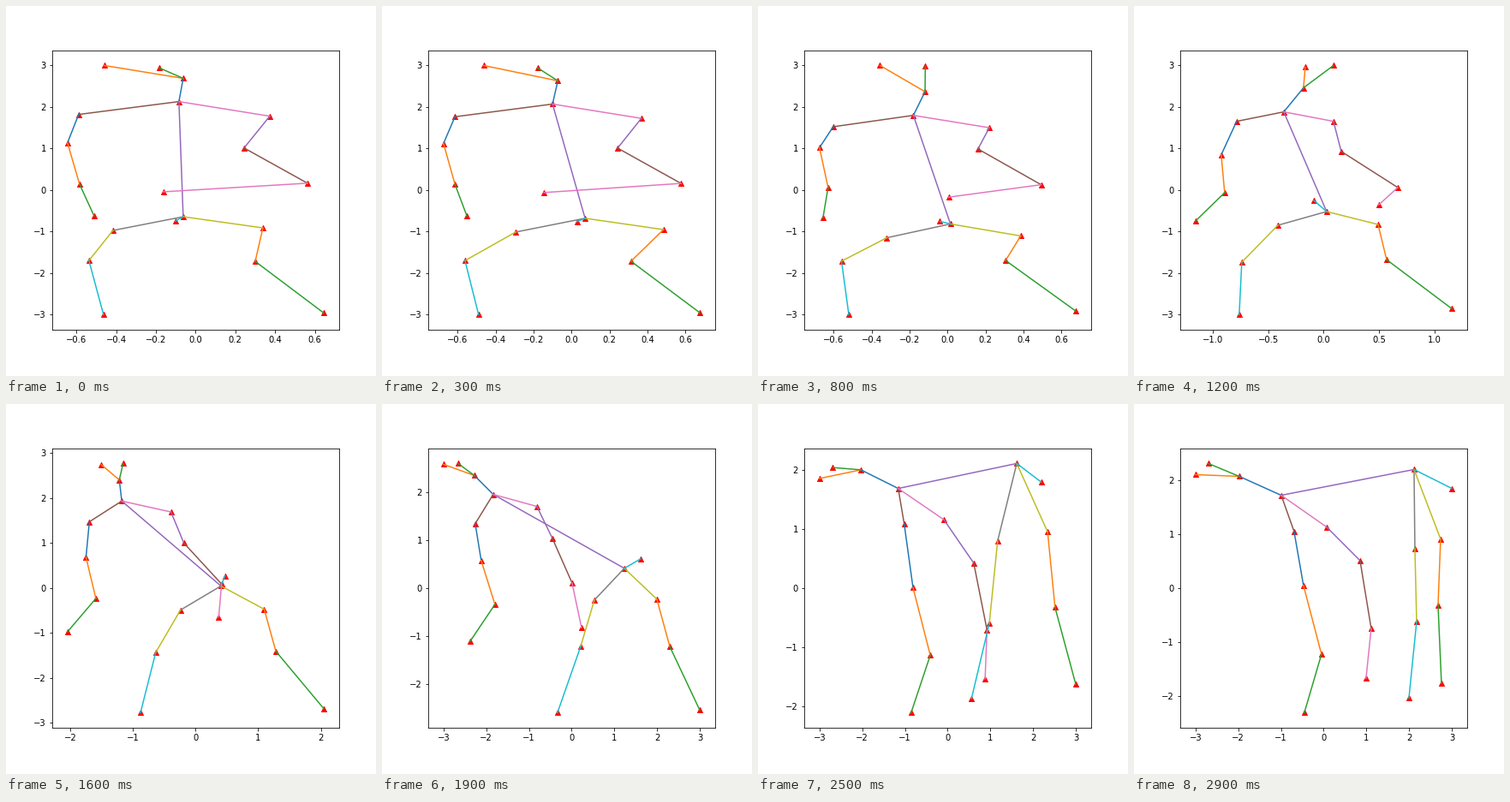
Recreate the animation shown at these times as a matplotlib script. Size 432x432 px, loop 3 s.

```python
import numpy as np
import matplotlib.pyplot as plt
from matplotlib.animation import FuncAnimation

FRAMES, INTERVAL = 30, 100
PAD = np.array([1.119, 1.121])  # axis limit / data extent


def fit(points):
    """Centre the points and scale them to the box from -1 to 1."""
    p = points - (points.max(0) + points.min(0)) / 2
    return p / p.max(0)


def pose(*points):
    return fit(np.array(points, float) * [1, -1])


# Rows: head, two face points, neck, pelvis, tail; left arm; right arm; legs
upright = pose(
    (207, 85), (115, 70), (179.5, 73), (202, 112), (207, 246), (198, 251),
    (85, 127), (72, 160), (86, 208), (103, 245),
    (308, 129), (278, 166), (352, 207), (184, 217),
    (125, 262), (97, 297), (114, 360), (300, 259), (291, 298), (371, 358))
tilt = pose(
    (198, 96), (200, 72), (233, 70), (175, 124), (225, 240), (210, 227),
    (120, 135), (102, 174), (106, 218), (72, 251),
    (233, 135), (242, 170), (308, 212), (286, 232),
    (168, 256), (126, 299), (123, 360), (285, 255), (295, 296), (371, 353))
drop = pose(
    (108, 84), (72, 71), (89, 70), (130, 106), (283, 192), (302, 181),
    (109, 140), (116, 183), (132, 234), (103, 277),
    (181, 120), (199, 157), (222, 209), (233, 261),
    (248, 229), (232, 283), (205, 360), (321, 228), (336, 283), (371, 357))
raised = pose(
    (123, 85), (72, 83), (87, 70), (172, 107), (327, 77), (371, 99),
    (187, 149), (198, 212), (219, 292), (199, 360),
    (225, 144), (264, 183), (277, 262), (271, 320),
    (328, 169), (330, 254), (321, 343), (358, 158), (355, 235), (359, 326))

HIPS = [4, 5, 14, 17]
TRUNK = HIPS + [0, 3, 6, 10]
HIND = [4, 5, *range(14, 20)]

# Joint chain and the cycle colour of its first bone
CHAINS = [
    ((3, 0), 0), ((0, 1), 1), ((0, 2), 2), ((3, 4), 4), ((3, 6), 5),
    ((3, 10), 6), ((4, 14), 7), ((4, 17), 8), ((4, 5), 9),
    (range(6, 10), 0), (range(10, 14), 4), (range(14, 17), 8),
    (range(17, 20), 1),
]
BONES = [(a, b, f"C{first + k}") for chain, first in CHAINS
         for k, (a, b) in enumerate(zip(chain, chain[1:]))]


def ease(step, start, end, power=1):
    return np.clip((step - start) / (end - start), 0, 1) ** power


def ease_out(step, start, end, power):
    return 1 - (1 - ease(step, start, end)) ** power


def pulse(u):
    return np.sin(np.pi * u)


def extent(step):
    """Half width and half height of the body."""
    half_x = (0.645 + 0.03 * ease(step, 0, 3) + 0.482 * ease(step, 8, 12, 0.9)
              + 1.843 * ease(step, 12, 19, 1.3))
    half_y = (3 - 0.4 * ease(step, 12, 19) - 0.928 * ease(step, 19, 22)
              + 0.642 * ease_out(step, 22, 29, 2))
    return np.array([half_x, half_y])


def body(step):
    if step < 12:
        # The hips sway out first, then the trunk dips
        u = step / 12
        p = upright + (tilt - upright) * u ** 2
        p[HIPS, 0] += 0.2 * pulse(u ** 0.5)
        p[TRUNK, 1] -= 0.08 * pulse(u ** 2)
    elif step < 19:
        p = tilt + (drop - tilt) * ease(step, 12, 19)
    else:
        # The back rises quickly, the hind legs step forward last
        u = ease(step, 19, 29)
        mix = np.full(drop.shape, u ** 0.5)
        mix[HIND, 0] = u ** 2
        mix[:, 1] = 1 - (1 - u) ** 6
        p = drop + (raised - drop) * mix
        p[TRUNK, 1] += 0.13 * pulse(u ** 0.5)
    return fit(p)


fig = plt.figure(figsize=(6, 6), dpi=72, facecolor="white")
fig.subplots_adjust(left=0.125, right=0.9, bottom=0.125, top=0.88)
ax = fig.add_subplot()
joints = ax.scatter(*upright.T, marker="^", color="red")
lines = [ax.plot([], [], color=color)[0] for _, _, color in BONES]


def update(step):
    half = extent(step)
    p = body(step) * half
    joints.set_offsets(p)
    for line, (a, b, _) in zip(lines, BONES):
        line.set_data(*p[[a, b]].T)
    limit_x, limit_y = half * PAD
    ax.set_xlim(-limit_x, limit_x)
    ax.set_ylim(-limit_y, limit_y)
    return [joints, *lines]


anim = FuncAnimation(fig, update, frames=FRAMES, interval=INTERVAL,
                     repeat=True, repeat_delay=0, blit=False)
plt.show()
```
